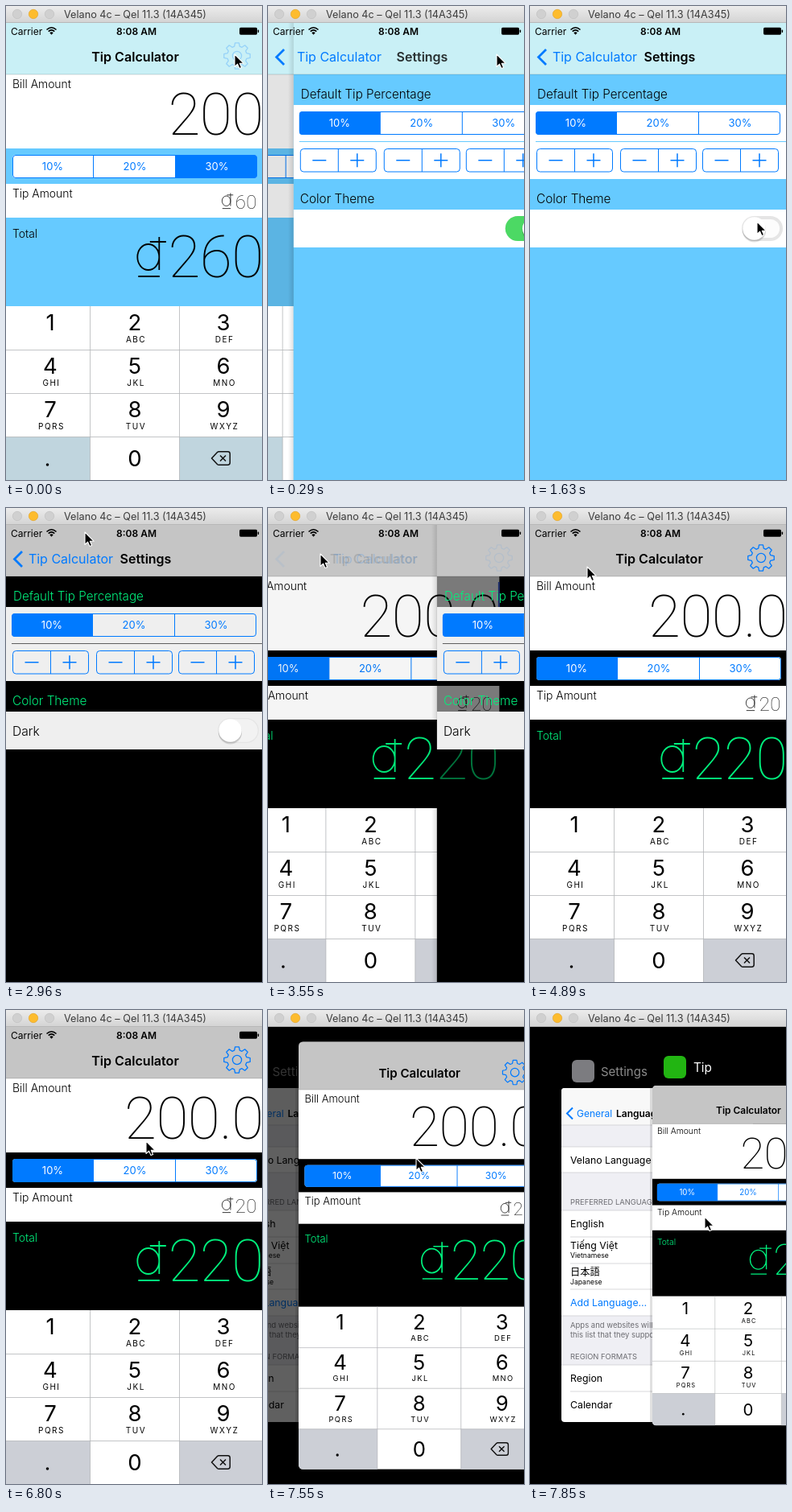
An HTML page for the animation above (8 s loop, 318 px wide and 589 px high).

```html
<!DOCTYPE html>
<html lang="en">
<head>
<meta charset="utf-8">
<title>Tip Calculator</title>
<style>
html, body { margin: 0; width: 100%; height: 100%; overflow: hidden; background: #000; }
svg { display: block; width: 100vw; height: 100vh; }
text { font-family: Inter, Roboto, "Noto Sans CJK JP", "Noto Sans CJK", sans-serif; white-space: pre; }
.thin { font-family: Roboto, Inter, sans-serif; }
</style>
</head>
<body>
<svg id="stage" viewBox="0 0 318 589" xmlns="http://www.w3.org/2000/svg"></svg>
<script>
const stage = document.getElementById('stage');
const LOOP = 8000, STEP = 148;
const BLUE = '#007aff', GREEN = [0, 240, 125], BLACK = [0, 0, 0], SKY = [102, 202, 255];

const clamp = v => Math.max(0, Math.min(1, v));
const lerp = (a, b, k) => a + (b - a) * k;
const mix = (a, b, k) => `rgb(${a.map((v, i) => Math.round(lerp(v, b[i], k)))})`;

// SVG helpers
const rect = (x, y, w, h, fill, more = '') =>
  `<rect x="${x}" y="${y}" width="${w}" height="${h}" fill="${fill}" ${more}/>`;
const circle = (x, y, r, fill, more = '') =>
  `<circle cx="${x}" cy="${y}" r="${r}" fill="${fill}" ${more}/>`;
const line = (d, color, width = 1, more = '') =>
  `<path d="${d}" fill="none" stroke="${color}" stroke-width="${width}" ${more}/>`;
const group = (more, body) => `<g ${more}>${body}</g>`;
const move = (x, y, body) => group(`transform="translate(${x} ${y})"`, body);
const text = (x, y, s, size, { fill = '#000', weight = 400, anchor = 'start', gap = 0, cls = '', alpha = 1 } = {}) =>
  `<text x="${x}" y="${y}" font-size="${size}" font-weight="${weight}" fill="${fill}" text-anchor="${anchor}"` +
  ` letter-spacing="${gap}" class="${cls}" opacity="${alpha}">${s}</text>`;
const middle = (x, y, s, size, more) => text(x, y, s, size, { anchor: 'middle', ...more });

// Step number -> value; the last entry at or before the step holds
const held = (keys, n) => keys[Math.max(...Object.keys(keys).map(Number).filter(k => k <= n))];

const CURSOR = {
  0: [284, 60], 5: [276, 105], 6: [264, 180], 7: [272, 245], 8: [282, 268],
  18: [268, 240], 19: [170, 110], 20: [98, 30], 21: [72, 46], 22: [65, 57],
  33: [71, 73], 34: [98, 120], 35: [138, 175], 36: [155, 192],
  41: [156, 190], 42: [156, 187], 45: [164, 176], 46: [174, 163],
  51: [184, 184], 52: [208, 238], 53: [217, 257]
};
const SETTINGS = { 0: 0, 1: .35, 2: .9, 3: 1, 23: .85, 24: .34, 25: .09, 26: .015, 27: 0 };
const THEME = { 0: 0, 12: .25, 13: .55, 14: .8, 15: 1 };
const TOGGLE = { 0: 1, 10: .35, 11: 0 };
const RING = { 0: 1, 11: .75, 12: .3, 13: 0 };
const SWITCHER = { 0: 0, 51: .25, 52: .8, 53: 1 };

const gearPath = (() => {
  const points = [];
  for (let i = 0; i < 8; i++) {
    const a = i * Math.PI / 4;
    for (const [da, r] of [[-.27, 12.3], [-.15, 16.4], [.15, 16.4], [.27, 12.3]])
      points.push(`${(r * Math.sin(a + da)).toFixed(2)} ${(-r * Math.cos(a + da)).toFixed(2)}`);
  }
  return `M${points.join('L')}Z`;
})();

const gear = alpha => group(`transform="translate(287 62)" opacity="${alpha}"`,
  line(gearPath, BLUE, 1.3, 'stroke-linejoin="round"') + circle(0, 0, 5.6, 'none', `stroke="${BLUE}" stroke-width="1.3"`));

const dong = (x, y, scale, color, width) =>
  group(`transform="translate(${x} ${y}) scale(${scale})"`,
    line('M28-50V-9M16.500-44H36.500M2-1H28.500M1-25a13.500 16 0 1 0 27 0a13.500 16 0 1 0-27 0', color, width));

const bigNumber = (y, s, fill) => text(319.6, y, s, 73, { fill, weight: 100, anchor: 'end', gap: -.6, cls: 'thin' });

function segments(x, y, chosen) {
  const edges = [0, 100.5, 202.5, 304];
  const clip = `inset(0 ${304 - edges[chosen + 1]}px 0 ${edges[chosen]}px)`;
  let out = rect(.5, .5, 303, 28, 'none', `rx="3.5" stroke="${BLUE}"`);
  out += rect(0, 0, 304, 29, BLUE, `rx="4" style="clip-path:${clip}"`);
  out += line('M100.500 0v29M202.500 0v29', BLUE);
  ['10%', '20%', '30%'].forEach((s, i) => {
    out += middle(50 + 102 * i, 19, s, 13, { fill: i === chosen ? '#fff' : BLUE });
  });
  return move(x, y, out);
}

function keypad(side) {
  const letters = ['', 'ABC', 'DEF', 'GHI', 'JKL', 'MNO', 'PQRS', 'TUV', 'WXYZ'];
  const columns = [55, 160, 270];
  let out = rect(0, 373, 320, 216, '#fff') + rect(0, 535.5, 104.5, 54, side) + rect(215.5, 535.5, 105, 54, side);
  out += line('M0 427.5H320M0 481.5H320M0 535.5H320M104.5 373V589M215.5 373V589', '#b4b6b9', .8);
  letters.forEach((s, i) => {
    const x = columns[i % 3], y = 403 + 54 * Math.floor(i / 3);
    out += middle(x, y, i + 1, 27.5) + middle(x + 1.5, y + 15, s, 10, { gap: 1.5 });
  });
  out += middle(160, 572, '0', 27.5) + circle(51.5, 570, 1.8, '#000');
  out += line('M255.500 562L262.500 554.500Q263.300 553.700 264.500 553.700H275.500Q278.200 553.700 278.200 556.400V567.600Q278.200 570.300 275.500 570.300H264.500Q263.300 570.300 262.500 569.500Z', '#111', 1.5, 'stroke-linejoin="round"');
  return out + line('M266 558.500l7 7m0-7l-7 7', '#111', 1.5);
}

function calculator(dark) {
  const back = dark ? '#000' : mix(SKY, SKY, 0);
  const tint = dark ? mix(GREEN, GREEN, 0) : '#000';
  const label = { weight: 300 };
  return rect(0, 85, 320, 504, back) + rect(0, 85, 320, 92, '#fff') + rect(0, 221, 320, 42, '#fff') +
    text(8, 102, 'Bill Amount', 13.9, label) +
    bigNumber(160, dark ? '200.0' : '200', '#000') + rect(318.5, 92, 2, 74, '#3b5bdb') +
    rect(8, 185, 304, 29, '#fff', 'rx="4"') + segments(8, 185, dark ? 0 : 2) +
    text(8, 238, 'Tip Amount', 13.9, label) +
    dong(268, 252, .39, '#333', 2.5) +
    text(311.8, 251.5, dark ? '20' : '60', 24, { fill: '#222', weight: 100, anchor: 'end', gap: .4, cls: 'thin' }) +
    text(8, 288, 'Total', 13.9, { weight: 300, fill: tint }) +
    dong(162.3, 337, 1, tint, 1.8) + bigNumber(337, dark ? '220' : '260', tint) +
    keypad(dark ? '#cccfd6' : '#c0d5de');
}

function toggle(on, ring) {
  const inset = 1.3 + 3.5 * ring;
  let out = rect(0, 0, 51, 31, '#e5e5e5', 'rx="15.5"');
  out += rect(inset, inset, 51 - 2 * inset, 31 - 2 * inset, '#fff', `rx="${15.5 - inset}" opacity="${lerp(.5, 1, ring)}"`);
  out += rect(0, 0, 51, 31, '#4cd964', `rx="15.5" opacity="${on}"`);
  const x = 15.5 + 20 * on;
  out += circle(x, 18, 14.6, '#000', 'opacity=".12"') + circle(x, 16.5, 14.6, '#000', 'opacity=".1"');
  return move(263, 261, out + circle(x, 15.5, 14.3, '#fff'));
}

function stepper(x) {
  return move(x, 177.5, rect(0, 0, 94, 28.5, 'none', `rx="4" stroke="${BLUE}"`) +
    line('M47 0V28.500', BLUE) + line('M15 14.250h17M62 14.250h17M70.500 5.750v17', BLUE, 1.5));
}

function settings(n, k, solid) {
  const cell = mix([255, 255, 255], [239, 239, 239], k);
  const head = { weight: 300, fill: mix(BLACK, GREEN, k) };
  const back = mix(SKY, BLACK, k);
  return rect(0, 85, 320, 504, back, `opacity="${solid ? 1 : lerp(1, .5, k)}"`) +
    rect(0, 373, 320, 216, back) +
    rect(0, 123, 320, 92, cell) + rect(0, 253, 320, 47, cell) +
    line('M7 168.500H320', mix(SKY, [95, 95, 95], k)) +
    text(9, 115, 'Default Tip Percentage', 15.2, head) +
    segments(7, 131, 0) + [8.5, 112.5, 214.5].map(stepper).join('') +
    text(8, 245, 'Color Theme', 15.3, head) +
    text(8, 283, 'Dark', 15.6, { weight: 300, alpha: k }) +
    toggle(held(TOGGLE, n), held(RING, n));
}

const navColor = k => mix([201, 240, 246], [197, 197, 197], k);

function navBar(n, p, k) {
  const x = 160.5 - 86 * p, backX = 160.5 - 80 * p;
  const pressed = n < 16 ? .25 : 1;
  return rect(0, 21, 320, 64, navColor(k)) + line('M0 85H320', '#000', .6, 'opacity=".25"') +
    middle(x, 69, 'Tip Calculator', 16.1, { weight: 600, alpha: clamp(1 - 2.6 * p) }) +
    middle(backX, 69, 'Tip Calculator', 16, { fill: BLUE, alpha: clamp(2 * p - .5) }) +
    line('M20 54L10.500 63.500L20 73', BLUE, 2.8, `opacity="${clamp(2 * p - .62)}"`) +
    middle(173.5 + 180 * (1 - p), 69, 'Settings', 16, { weight: 600, alpha: clamp(2 * p - 1) }) +
    gear(pressed * clamp(1 - 2.7 * p));
}

function statusBar() {
  return text(6, 35.5, 'Carrier', 12) + middle(162, 35.5, '8:08 AM', 12, { weight: 600 }) +
    line('M50.500 29.500Q56.500 24 62.500 29.500M52.700 31.700Q56.500 28.200 60.300 31.700', '#000', 1.6) +
    `<path d="M54.300 33.300Q56.500 31.300 58.700 33.300L56.500 35.700Z"/>` +
    rect(290, 26.7, 22, 9, '#000', 'rx="1.6"') + rect(312.7, 29.6, 1.4, 3.4, '#000', 'rx=".6"');
}

function languageCard() {
  const soft = '#efeff4', grey = { fill: '#6d6d72' };
  const row = (y, s, fill = '#000') => text(50, y, s, 12.3, { fill });
  return rect(39, 97, 238, 415, '#fff') + rect(39, 97, 238, 46, '#f8f8f8') +
    line('M53 121.500L46 128.500L53 135.500', BLUE, 2) +
    text(58, 133, 'General', 12, { fill: BLUE }) + text(107, 133, 'Language &amp; Region', 12, { weight: 600 }) +
    rect(39, 143, 238, 27, soft) + row(190.5, 'Velano Language') +
    rect(39, 202, 238, 47, soft) + text(50, 242, 'PREFERRED LANGUAGE ORDER', 9.4, grey) +
    row(269.5, 'English') + row(297, 'Tiếng Việt') + text(50, 308, 'Vietnamese', 8.6) +
    row(329.5, '日本語') + text(50, 341, 'Japanese', 8.6) + row(368, 'Add Language…', BLUE) +
    rect(39, 380, 238, 61, soft) +
    text(50, 394.5, 'Apps and websites will use the first', 9.5, grey) +
    text(50, 406.5, 'this list that they support.', 9.5, grey) +
    text(50, 434, 'REGION FORMATS', 9.4, grey) + row(462, 'Region') + row(495, 'Calendar') +
    line('M39 143H277M39 170H277M39 202H277M39 249H277M50 282H277M50 315H277M50 347H277M39 380H277M39 441H277M50 474H277', '#c8c7cc', .7);
}

function switcher(s) {
  const scale = lerp(1, .744, s);
  const card = navBar(53, 0, 1) + calculator(true);
  return rect(0, 21, 318, 568, '#000') +
    group(`transform="translate(${-110 * (1 - s)} 0)" opacity="${clamp(s * 1.5)}"`,
      group('style="clip-path:inset(0 round 4px)"', languageCard()) +
      rect(52, 62, 28, 28, '#7c7c80', 'rx="6"') + text(88, 81.5, 'Settings', 15, { fill: '#8b8b8b' })) +
    group(`transform="translate(${152 * s} ${78.1 * s}) scale(${scale})"`,
      rect(-4, 21, 4, 568, '#000', 'opacity=".12"') + group('clip-path="url(#card)"', card)) +
    group(`opacity="${clamp(2 * s - 1)}"`,
      rect(166, 57, 28, 28, '#22b512', 'rx="6"') + text(203, 76.5, 'Tip', 15.3, { fill: '#fff' }));
}

function titleBar() {
  return rect(0, 0, 318, 21, 'url(#bar)') + line('M0 20.500H318', '#b8b8b8') +
    circle(14, 10, 5.7, '#d0d0d0', 'stroke="#bdbdbd" stroke-width=".6"') +
    circle(34, 10, 5.7, '#fdbc2e', 'stroke="#e0a020" stroke-width=".6"') +
    circle(54, 10, 5.7, '#d0d0d0', 'stroke="#bdbdbd" stroke-width=".6"') +
    middle(160.5, 15, 'Velano 4c – Qel 11.3 (14A345)', 12.7, { fill: '#3c3c3c' });
}

const DEFS = `<defs>
  <linearGradient id="bar" x2="0" y2="1"><stop stop-color="#ececec"/><stop offset="1" stop-color="#d3d3d3"/></linearGradient>
  <linearGradient id="shade"><stop stop-opacity="0"/><stop offset="1" stop-opacity=".12"/></linearGradient>
  <clipPath id="card"><rect y="21" width="320" height="568" rx="6"/></clipPath>
</defs>`;

function scene(n) {
  const p = held(SETTINGS, n), k = held(THEME, n), s = held(SWITCHER, n);
  const edge = 318 * (1 - p);
  let out = DEFS;
  if (s > 0) {
    out += switcher(s);
  } else {
    out += rect(0, 21, 318, 568, '#000');
    if (p < 1) out += move(-96 * p, 0, calculator(n >= 16) + rect(0, 85, 320, 288, '#000', `opacity="${.12 * p}"`));
    if (p > 0) out += move(edge, 0, settings(n, k, p === 1));
    out += navBar(n, p, k) + statusBar();
    if (p > 0 && p < 1) out += rect(edge - 7, 21, 7, 568, 'url(#shade)');
  }
  const [x, y] = held(CURSOR, n);
  return out + titleBar() + move(x, y,
    '<path d="M0 0V15.500L3.600 12.200L6 17.600L8.600 16.500L6.300 11.300H11.200Z" stroke="#fff" stroke-width="1.1" stroke-linejoin="round"/>');
}

let shown = -1;
const start = performance.now();
function tick() {
  const t = (performance.now() - start) % LOOP;
  const n = Math.min(53, Math.floor((t + 10) / STEP));
  if (n !== shown) stage.innerHTML = scene(shown = n);
  requestAnimationFrame(tick);
}
tick();
</script>
</body>
</html>
```
